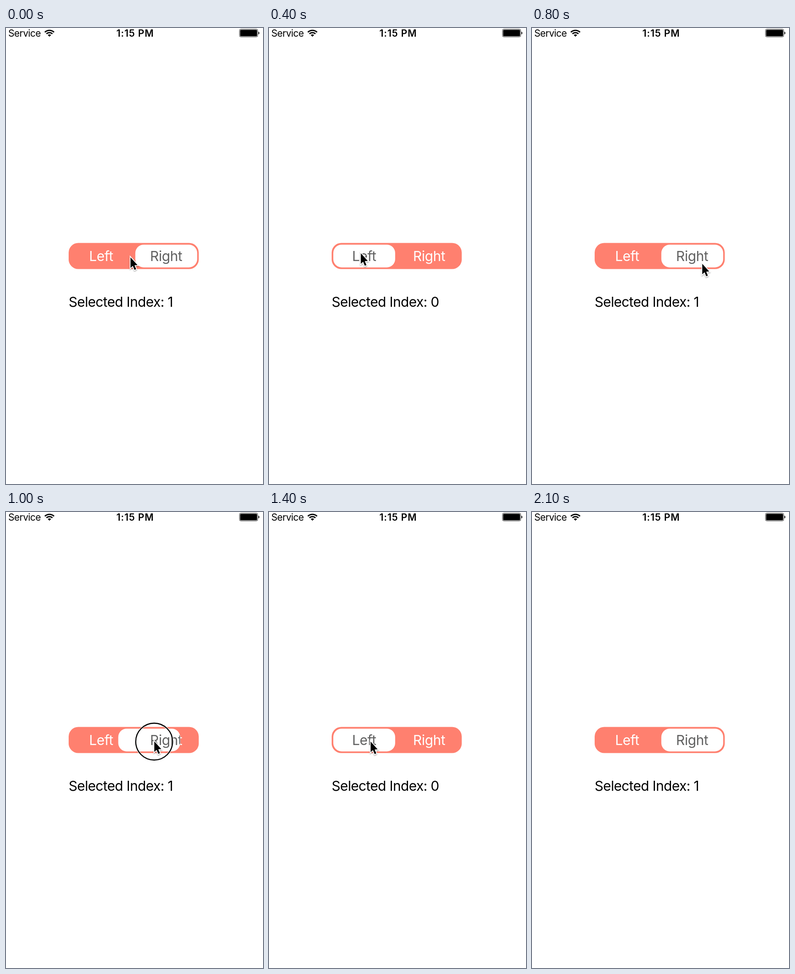
Write an HTML page that moves like this. It is 562 by 996 pixels and loops after 2400 ms.

```html
<!DOCTYPE html>
<html lang="en">
<head>
<meta charset="utf-8">
<title>Segmented switch</title>
<style>
  html, body { margin: 0; width: 100%; height: 100%; overflow: hidden; background: #fff; }
  svg { display: block; width: 100%; height: 100%; }
  text { font: 400 29.9px Inter, "Open Sans", sans-serif; font-optical-sizing: none; letter-spacing: -.6px; }
  .status { font-size: 21px; }
  .clock { font-weight: 600; letter-spacing: .9px; }
  .labels text { text-anchor: middle; letter-spacing: -.35px; }
</style>
</head>
<body>
<svg viewBox="0 0 562 996">
  <defs>
    <clipPath id="thumbClip"><rect class="thumb" y="473.2" width="135.3" height="49.8" rx="18.5"/></clipPath>
    <g id="labels" class="labels">
      <text x="208" y="509">Left</text>
      <text x="350.3" y="509">Right</text>
    </g>
    <filter id="shadow" x="-50%" y="-50%" width="200%" height="200%">
      <feDropShadow dx="0" dy="1.5" stdDeviation="1.3" flood-opacity=".4"/>
    </filter>
  </defs>

  <text class="status" x="5" y="19">Service</text>
  <g fill="none" stroke="#000" stroke-width="2.9">
    <path d="M85 9.3A14.1 14.1 0 0 1 105 9.3M88.5 12.8A9.2 9.2 0 0 1 101.5 12.8"/>
    <path d="M95 19L91.4 15.4A5.1 5.1 0 0 1 98.6 15.4Z" fill="#000" stroke="none"/>
  </g>
  <text class="status clock" x="282.5" y="19" text-anchor="middle">1:15 PM</text>
  <rect x="510.5" y="2.5" width="40" height="17" rx="3" fill="none" stroke="#222"/>
  <rect x="512" y="4" width="37" height="14" rx="1.5"/>
  <path d="M552 8Q554 8.5 554 11T552 14Z"/>

  <rect x="137" y="469.5" width="284.5" height="57" rx="21" fill="#ff806f"/>
  <use href="#labels" fill="#fff"/>
  <g clip-path="url(#thumbClip)">
    <rect x="137" y="469" width="285" height="58" fill="#fff"/>
    <use href="#labels" fill="#606060"/>
  </g>
  <text id="status" x="137" y="608.5"></text>

  <g id="pointer">
    <g id="ring" fill="none">
      <circle r="40.3" stroke="#fff" stroke-width="4.5" opacity=".8"/>
      <circle r="40.3" stroke="#000" stroke-width="2.4"/>
    </g>
    <path d="M.3-.5V22.5L5.3 18L9 26.7L12.6 25.2L9 16.7L15.5 16.2Z"
          stroke="#fff" stroke-width="3.4" paint-order="stroke" filter="url(#shadow)"/>
  </g>
</svg>
<script>
const LOOP = 2400, STEP = 100;
const LEFT = 140.6, RIGHT = 282.8;

// Each key is [time, ...values].
const pointerKeys = [
  [0, 272, 501.5], [100, 222, 495], [200, 200.5, 492.5], [400, 200.5, 492.5],
  [500, 280, 503], [600, 366, 515], [700, 372, 515.5], [800, 372, 515.5],
  [900, 361, 500], [1000, 324, 501.5], [1200, 238.5, 501.5], [1300, 215, 502],
  [1400, 222, 502], [1500, 258, 505], [1600, 324, 510.5], [1700, 338, 507], [1800, 337.5, 506]
];
const thumbKeys = [
  [200, RIGHT], [300, 180], [400, LEFT], [600, LEFT], [700, 243], [800, RIGHT],
  [900, RIGHT], [1000, 245.5], [1200, 155.7], [1300, LEFT], [1400, LEFT],
  [1500, 157], [1600, 220], [1700, 262], [1800, RIGHT]
];
const presses = [[200, 300], [600, 700], [900, 1400], [1500, 1700]];

const $ = id => document.getElementById(id);
const thumb = document.querySelector('.thumb');

function sample(keys, t) {
  const next = keys.findIndex(key => key[0] > t);
  if (next === 0) return keys[0].slice(1);
  if (next < 0) return keys.at(-1).slice(1);
  const a = keys[next - 1], b = keys[next];
  const k = (t - a[0]) / (b[0] - a[0]);
  return a.slice(1).map((v, i) => v + (b[i + 1] - v) * k);
}

function draw(now) {
  const t = Math.floor(now % LOOP / STEP) * STEP;
  const pressed = presses.some(([down, up]) => t >= down && t < up);
  const releases = presses.filter(([, up]) => t >= up).length;

  thumb.setAttribute('x', sample(thumbKeys, t)[0]);
  $('pointer').setAttribute('transform', `translate(${sample(pointerKeys, t)})`);
  $('pointer').style.display = t < 2100 ? '' : 'none';
  $('ring').style.display = pressed ? '' : 'none';
  // Every release flips the switch.
  $('status').textContent = 'Selected Index: ' + (releases + 1) % 2;
}

const start = performance.now();
function tick() {
  draw(performance.now() - start);
  requestAnimationFrame(tick);
}
tick();
</script>
</body>
</html>
```
